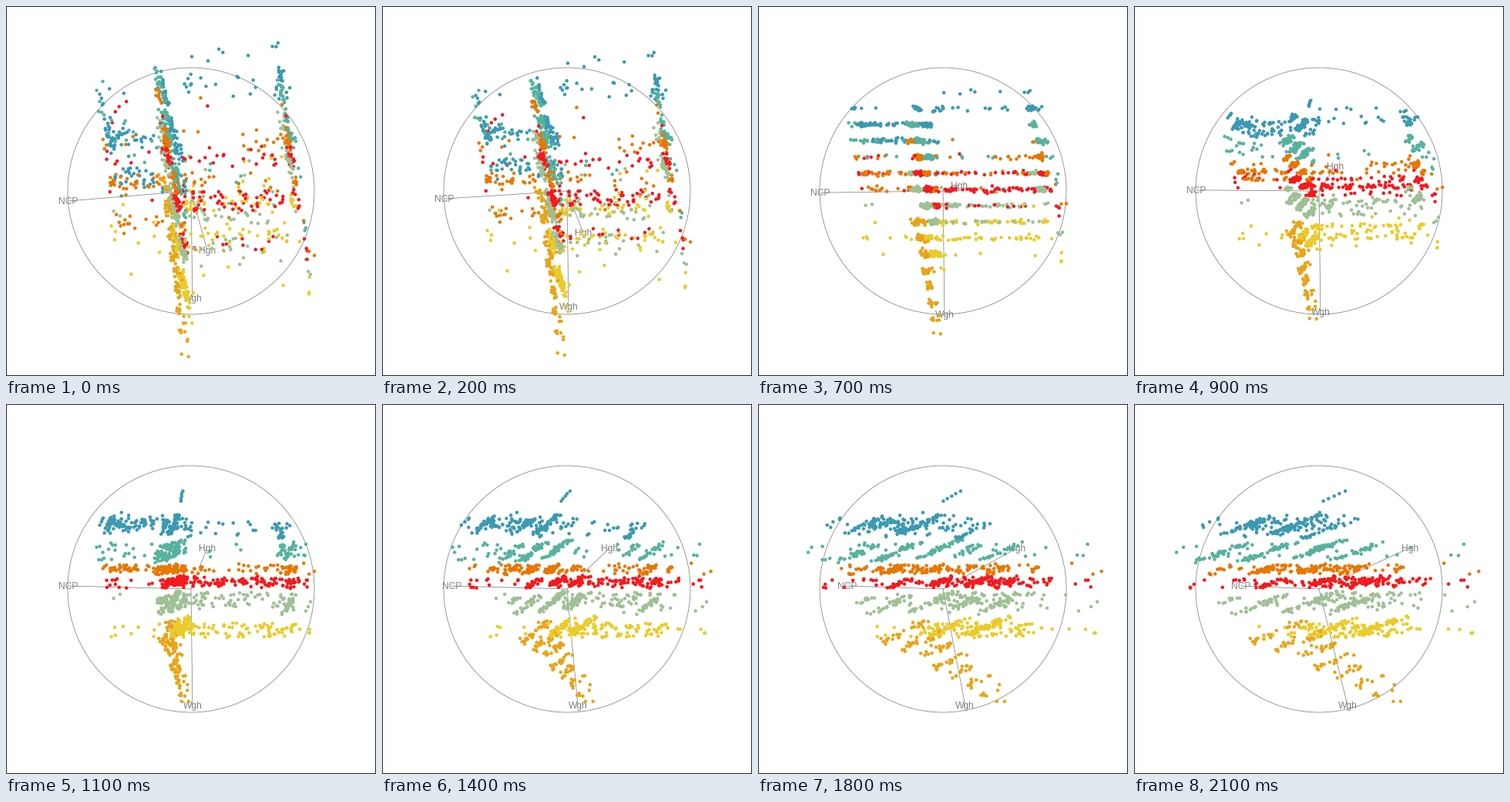
A matplotlib script for the animation above (2.2 s loop, 480x480 px).

```python
import numpy as np
import matplotlib.pyplot as plt
from matplotlib.animation import FuncAnimation
from matplotlib.patches import Circle, Rectangle

SIZE, MID, RADIUS = 480, 240, 160
FRAMES, STEP = 22, 4.5          # degrees turned per frame
TILT, SPIN, TURN = 48.3, 43.3, 11
PX = 0.72                       # points per pixel at 100 dpi
GREY = "#7f7f7f"

BLUE, TEAL, GREEN = "#3B99B1", "#56B29E", "#9FC095"
YELLOW, GOLD, ORANGE, RED = "#EACB2B", "#E8A419", "#E87700", "#F5191C"

# each axis as (across, down, depth)
AXES = {
    "NCP": (-0.993, -0.025, 0.130),
    "Wgh": (0.012, 0.942, 0.324),
    "Hgh": (0.130, -0.332, 0.935),
}

# colour bands from top to bottom, split at these heights
EDGES = [-100, -66, -34, -18, 0, 34, 63]
# depth range and size of the core, then (count, mean depth) of the side groups
BANDS = [
    (BLUE, -120, 55, 75, (90, 10), (28, -125), (18, -138)),
    (TEAL, -150, 65, 130, (20, -60), (4, 0), (42, -75)),
    (ORANGE, -145, 95, 85, (50, 20), (34, -30), (32, -45)),
    (RED, -95, 95, 90, (12, -60), (95, 15), (26, -30)),
    (GREEN, -115, 100, 120, (2, 0), (65, 40), (40, -65)),
    (YELLOW, 40, 150, 105, (9, 20), (80, 5), (10, -20)),
]

# weights fall on evenly spaced levels
LEVEL, OFFSET = 21, -2
W_DOWN, W_DEPTH = 0.957, 0.289
DRIFT = 0.135                   # sideways lean with depth

rng = np.random.default_rng(7)
parts, shades = [], []


def add(color, across, down, depth):
    parts.append(np.column_stack([across, down, depth]))
    shades.extend([color] * len(depth))


def heights(depth, lo, hi, z0, z1):
    """Spread over the band, a little higher where deeper."""
    zn = np.clip((2 * depth - z0 - z1) / (z1 - z0), -1, 1)
    q = 0.65 * rng.uniform(-1, 1, len(depth)) - 0.35 * zn
    return (lo + hi) / 2 + (hi - lo) / 2 * q


def to_level(down, depth):
    """Shift depth so that each weight sits near a level."""
    w = W_DOWN * down + W_DEPTH * depth
    w = OFFSET + LEVEL * np.round((w - OFFSET) / LEVEL)
    w = w + rng.normal(0, 1.6, len(w))
    return (w - W_DOWN * down) / W_DEPTH


def core(down, depth):
    noise = rng.normal(0, 2.3, len(depth))
    return -23 + DRIFT * depth - 0.04 * down + noise


def left(down, depth):
    return -106 + DRIFT * depth + 65 * rng.random(len(depth)) ** 2


def right(down, depth):
    return -10 + 135 * rng.random(len(depth)) ** 1.3


def edge(down, depth):
    return 136 + DRIFT * depth + rng.normal(0, 2.5, len(depth))


for (color, z0, z1, n, *sides), lo, hi in zip(BANDS, EDGES, EDGES[1:]):
    groups = [(core, rng.uniform(z0, z1, n))]
    for place, (count, mean) in zip((left, right, edge), sides):
        spread = 15 if mean < -100 else 42
        groups.append((place, rng.normal(mean, spread, count)))
    for place, depth in groups:
        down = heights(depth, lo, hi, z0, z1)
        depth = to_level(down, depth)
        add(color, place(down, depth), down, depth)
    if color != BLUE:
        depth = rng.uniform(70, 140, 3)
        down = rng.uniform(lo, hi, 3)
        add(color, edge(down, depth), down, depth)

# the heaviest group: one thinning row per level
for k in range(8):
    depth = -42 + 30 * k + rng.uniform(-1, 1, 30 - 4 * k) * (44 - 4 * k)
    w = OFFSET + LEVEL * (k + 2) + rng.normal(0, 2.5, len(depth))
    down = (w - W_DEPTH * depth) / W_DOWN
    add(GOLD, core(down, depth), down, depth)

# a few light ones above the top band
depth = np.linspace(22, 61, 5)
down = np.linspace(-114, -127, 5)
add(BLUE, core(down, depth), down, depth)

data = np.vstack(parts)
order = rng.permutation(len(data))
data, shades = data[order], [shades[i] for i in order]


def project(p, k):
    """Tilt down to level first, then spin sideways."""
    a = np.radians(max(0, TILT - STEP * k))
    b = np.radians(np.clip(STEP * (k - TURN), 0, SPIN))
    u, v, z = np.asarray(p).T
    return np.column_stack([u * np.cos(b) + z * np.sin(b),
                            v * np.cos(a) + z * np.sin(a)])


fig = plt.figure(figsize=(4.8, 4.8), dpi=100, facecolor="white")
ax = fig.add_axes([0, 0, 1, 1])
ax.set(xlim=(0, SIZE), ylim=(SIZE, 0))
ax.axis("off")

ax.add_patch(Rectangle((0.5, 0.5), SIZE - 1, SIZE - 1, fill=False,
                       ec="#282828", lw=PX, snap=False, zorder=1))
ax.add_patch(Circle((MID, MID), RADIUS, fill=False, ec=GREY,
                    lw=0.75 * PX, zorder=1))
spokes = [ax.plot([], [], color=GREY, lw=0.75 * PX, zorder=1)[0] for _ in AXES]
labels = [ax.text(0, 0, name, color=GREY, ha="center", va="baseline",
                  family="Liberation Sans", fontsize=12 * PX, zorder=2)
          for name in AXES]
dots = ax.scatter(data[:, 0], data[:, 1], s=(4.5 * PX) ** 2, c=shades,
                  linewidths=0, zorder=3)
tips = RADIUS * np.array(list(AXES.values()))


def update(k):
    dots.set_offsets(MID + project(data, k))
    for (x, y), line, label in zip(MID + project(tips, k), spokes, labels):
        line.set_data([MID, x], [MID, y])
        label.set_position((x, y + 4.3))
    return [dots, *spokes, *labels]


anim = FuncAnimation(fig, update, frames=FRAMES, interval=100,
                     repeat=True, repeat_delay=0, blit=False)
plt.show()
```
